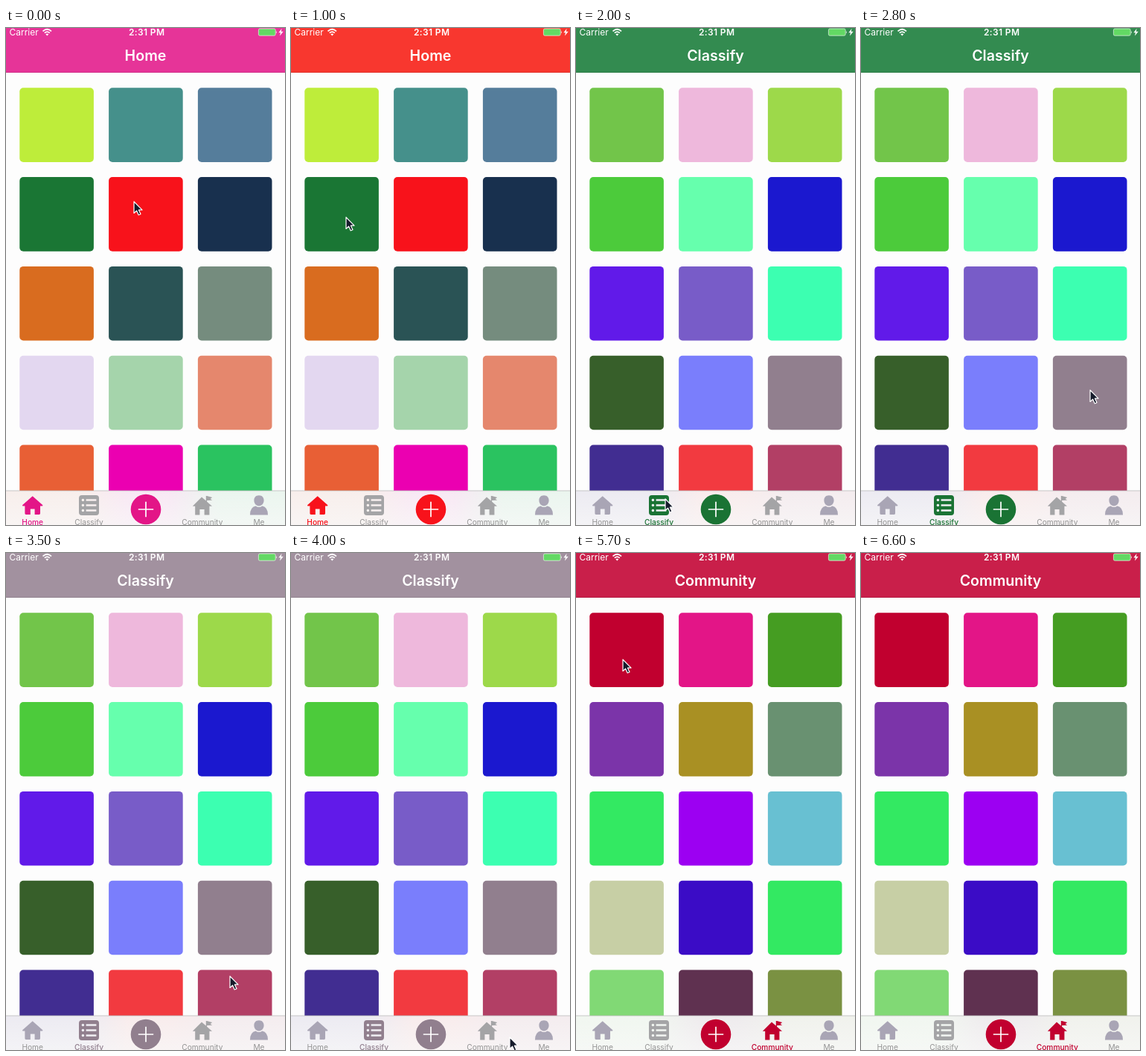
Animation, 375 px wide and 667 px high, one loop 6700 ms. Source, as an HTML page:

```html
<!DOCTYPE html>
<html lang="en">
<head>
<meta charset="utf-8">
<title>Theme picker</title>
<style>
html, body { margin: 0; width: 100%; height: 100%; overflow: hidden; background: #fdfdfd; }
svg { display: block; width: 100vw; height: 100vh; }
text { font-family: Inter, Roboto, sans-serif; }
.status { font-size: 12px; fill: #fff; }
.label { font-size: 10.2px; text-anchor: middle; }
</style>
</head>
<body>
<svg viewBox="0 0 375 667">
  <defs>
    <linearGradient id="blur">
      <stop offset=".1"/><stop offset=".28"/><stop offset=".44"/>
      <stop offset=".58"/><stop offset=".76"/><stop offset=".95"/>
    </linearGradient>
    <linearGradient id="fade" x2="0" y2="1">
      <stop stop-color="#f9f9f9" stop-opacity="0"/><stop offset="1" stop-color="#f9f9f9" stop-opacity=".6"/>
    </linearGradient>
  </defs>
  <rect width="375" height="667" fill="#fdfdfd"/>
  <g id="tiles"></g>

  <rect id="header" width="375" height="60"/>
  <rect y="59.5" width="375" height=".5" opacity=".2"/>
  <text class="status" x="4.5" y="10">Carrier</text>
  <g fill="none" stroke="#fff" stroke-width="1.7">
    <path d="M49.5 4.3Q55.3-.8 61 4.3M51.8 6.7Q55.3 3.6 58.8 6.7"/>
    <path d="M53.3 8.2Q55.3 6.6 57.3 8.2L55.3 10.4Z" fill="#fff" stroke="none"/>
  </g>
  <text class="status" x="189.2" y="10" text-anchor="middle" font-weight="600" letter-spacing=".35">2:31 PM</text>
  <rect x="339.4" y="1" width="22.8" height="9.2" rx="1.8" fill="#63d964" stroke="#fff" stroke-opacity=".75" stroke-width=".8"/>
  <path d="M363 4q1.8 1.6 0 3.4z" fill="#fff"/>
  <path d="M370.6.8L366.4 6.3H369L368 10.6L372.8 4.7H369.8Z" fill="#fff"/>
  <text id="title" x="187.5" y="44" text-anchor="middle" font-size="19.6" font-weight="600" fill="#fff"></text>

  <rect y="621" width="375" height="46" fill="#f9f9f9"/>
  <rect y="621" width="375" height="46" fill="url(#blur)" opacity=".07"/>
  <rect y="621" width="375" height="46" fill="url(#fade)"/>
  <rect y="620.5" width="375" height="1" fill="#b9b9b9" opacity=".8"/>
  <g id="tabs"></g>
  <circle id="add" cx="188" cy="646" r="20.3"/>
  <path d="M177.8 646H198.2M188 635.8V656.2" stroke="#fff" stroke-width="1.7"/>

  <path id="cursor" d="M0 0V15.5L3.6 12.2L6.2 18L9 16.8L6.4 11.2H11Z" fill="#151b2b" stroke="#fff" stroke-width="1.2" stroke-linejoin="round"/>
</svg>
<script>
const LOOP = 6700, STEP = 100;
const $ = id => document.getElementById(id);

function add(parent, tag, attrs, text = "") {
  const el = document.createElementNS("http://www.w3.org/2000/svg", tag);
  for (const key in attrs) el.setAttribute(key, attrs[key]);
  el.textContent = text;
  return parent.appendChild(el);
}

const pages = {
  Home: "beed3a 45908b 557d9b 1a7634 f8121b 18304e d96c1f 2a5355 758c7e e3d7f0 a5d4ab e5876d e85f35 eb00b1 2ac360",
  Classify: "72c54a eeb8dc 9dd94a 4ccb3b 66ffad 1b18cf 611ae9 785cc8 3cffb1 375f2a 7a7efc 917f8e 412d91 f23a40 b23f65",
  Community: "c1002f e31587 459d22 7b34a9 a99023 699171 33e962 9c00f2 68c0d2 c7cfa5 3b0cc6 33e962 81d975 5f3150 7a9142"
};
for (const name in pages) pages[name] = pages[name].split(" ").map(hex => "#" + hex);

const house = "M35.7 628.2L49.3 640.2Q49.8 641.4 48.4 641.5H46V651.6Q46 653 44.6 653H38.6V645.5H32.8V653H26.8Q25.4 653 25.4 651.6V641.5H23Q21.6 641.4 22.1 640.2Z";
const rows = [633.5, 640.5, 647.5].map(y =>
  `M101.6 ${y}a1.8 1.8 0 1 0 3.6 0a1.8 1.8 0 1 0 -3.6 0ZM107.6 ${y - 1.2}H121.4V${y + 1.2}H107.6Z`).join("");
const list = "M102 627H121Q125 627 125 631V650Q125 654 121 654H102Q98 654 98 650V631Q98 627 102 627Z" + rows;
const school = "M263 629.5L268.8 634.6V628H270.1L277.2 630L274.6 632L277.2 633.8L270.1 634V635.8L277 641.8H273.4V653.5H266.6V646H260.4V653.5H254.2V641.8H250.8Z";
const person = "M340 627.2C344.4 627.2 346.6 630 346.6 634C346.6 638 344 641.4 340 641.4C336 641.4 333.4 638 333.4 634C333.4 630 335.6 627.2 340 627.2ZM328 653.5Q328 643.2 335.6 641.6Q340 644.6 344.4 641.6Q352 643.2 352 653.5Z";

const tabs = [
  ["Home", 35.7, house, "#a9a5b5"],
  ["Classify", 111.5, list, "#a4a4a6"],
  ["Community", 263.8, school, "#a4a4a6"],
  ["Me", 340, person, "#a9a5b5"]
].map(([name, x, d, idle]) => ({
  name, idle,
  icon: add($("tabs"), "path", { d, "fill-rule": "evenodd" }),
  label: add($("tabs"), "text", { x, y: 667, class: "label" }, name)
}));

const tiles = pages.Home.map((_, i) => add($("tiles"), "rect", {
  x: 18.3 + i % 3 * 119.8, y: 80.3 + Math.floor(i / 3) * 119.8, width: 99.6, height: 99.6, rx: 5
}));
const blurStops = document.querySelectorAll("#blur stop");

// [start, theme colour, header colour]
const themes = [
  [0, "#e31587", "#e63498"],
  [500, "#f8121b", "#f8372f"],
  [1300, "#1a7334", "#338b50"],
  [3000, "#917f8e", "#a2919f"],
  [5500, "#c1002f", "#c91f4a"]
];
const visits = [[0, "Home"], [1900, "Classify"], [4100, "Community"]];

// [time, x, y] of the pointer tip
const pointer = [
  [0, 172, 233], [500, 172, 233], [900, 74, 254], [1300, 74, 254],
  [1800, 120, 632], [2100, 120, 632], [2700, 308, 486], [3200, 308, 486],
  [3800, 294, 650], [4100, 294, 650], [4600, 315, 178], [4900, 315, 170],
  [5400, 63, 143], [5800, 63, 143], [6300, -20, 150], [LOOP, -20, 150]
];

const current = (list, t) => list.filter(([start]) => start <= t).pop();

function pointerAt(t) {
  const i = pointer.findIndex(([time]) => time > t);
  const [t0, x0, y0] = pointer[i - 1], [t1, x1, y1] = pointer[i];
  const p = (t - t0) / (t1 - t0), e = p * p * (3 - 2 * p);
  return [x0 + (x1 - x0) * e, y0 + (y1 - y0) * e];
}

function draw(t) {
  const [, theme, header] = current(themes, t);
  const page = current(visits, t)[1], colors = pages[page];
  tiles.forEach((tile, i) => tile.setAttribute("fill", colors[i]));
  blurStops.forEach((stop, i) => stop.setAttribute("stop-color", colors[12 + (i >> 1)]));
  $("header").setAttribute("fill", header);
  $("add").setAttribute("fill", theme);
  $("title").textContent = page;
  for (const { name, idle, icon, label } of tabs) {
    const active = name === page;
    icon.setAttribute("fill", active ? theme : idle);
    label.setAttribute("fill", active ? theme : "#949494");
    label.setAttribute("font-weight", active ? 500 : 400);
  }
  $("cursor").setAttribute("transform", `translate(${pointerAt(t)})`);
}

const begin = performance.now();
function frame() {
  const t = (performance.now() - begin) % LOOP;
  draw(Math.floor(t / STEP) * STEP);
  requestAnimationFrame(frame);
}
frame();
</script>
</body>
</html>
```
